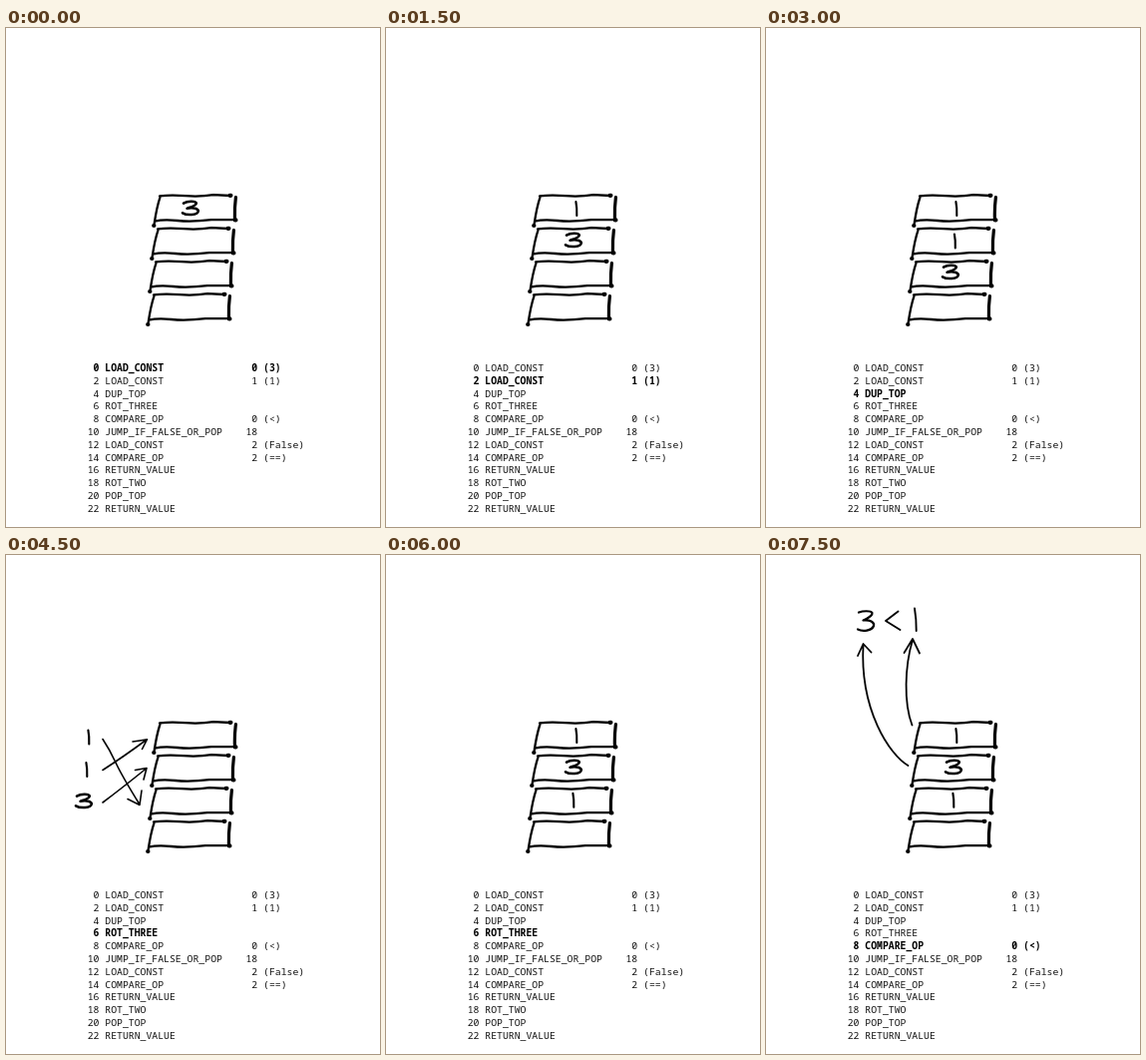
An HTML page for the animation above (8 s loop, 375 by 500 pixels).

```html
<!DOCTYPE html>
<html lang="en">
<head>
<meta charset="utf-8">
<title>Bytecode stack</title>
<style>
  html, body { margin: 0; width: 100%; height: 100%; overflow: hidden; background: #fff; }
  svg { display: block; width: 100%; height: 100%; }
  text { font: 9.8px "Noto Sans Mono", monospace; white-space: pre; fill: #111; }
  text.on { font-weight: 700; fill: #000; }
  path { fill: none; stroke: #000; stroke-linecap: round; stroke-linejoin: round; }
</style>
</head>
<body>
<svg id="stage" viewBox="0 0 375 500">
  <g id="boxes"></g>
  <g id="drawing"></g>
  <g id="code"></g>
</svg>
<script>
const STEP = 1500, LOOP = 8000;
const $ = id => document.getElementById(id);

const CODE = [
  ['LOAD_CONST', 0, '(3)'],
  ['LOAD_CONST', 1, '(1)'],
  ['DUP_TOP'],
  ['ROT_THREE'],
  ['COMPARE_OP', 0, '(<)'],
  ['JUMP_IF_FALSE_OR_POP', 18],
  ['LOAD_CONST', 2, '(False)'],
  ['COMPARE_OP', 2, '(==)'],
  ['RETURN_VALUE'],
  ['ROT_TWO'],
  ['POP_TOP'],
  ['RETURN_VALUE']
];

const stroke = (d, width, x = 0, y = 0) =>
  `<path d="${d}" stroke-width="${width}" transform="translate(${x} ${y})"/>`;

// One hand-drawn slot; its line ends are thickened with dots.
const slot = (x, y) =>
  stroke('M154 168.3Q166 167 180 168.2T208 167.2L225 168M154.5 169.5Q151 180 148.7 196' +
         'M149 193.6Q158 191.5 172 193T206 192.2L230 192.2', 2.3, x, y) +
  stroke('M230.4 169.5Q229 180 229.4 192', 3.2, x, y) +
  stroke('M224.6 167.8h.8M148.2 198h.2M229.8 192.4h.6', 4.2, x, y);

const GLYPHS = {
  1: 'M-.6 -7Q.6 -1 .3 7',
  3: 'M-7 -4.8C-3 -7.2 5 -7.4 5.8 -5C6.2 -2.4 0 -1 -3.4 .2C3 -1.2 8 .6 7.8 3C7.4 7.2 -4 7.4 -8 4.8'
};
const digit = (n, x, y) => stroke(GLYPHS[n], n === 1 ? 2.1 : 2.6, x, y);

// Centres of the digits in the top three slots.
const PLACES = {
  1: [[191, 181], [189.5, 213.5], [188, 245.8]],
  3: [[185, 180.5], [188, 212.5], [185, 244.5]]
};
const stack = (...values) => values.map((n, i) => digit(n, ...PLACES[n][i])).join('');

const rotation = () =>
  digit(1, 83, 182.5) + digit(1, 81, 215) + digit(3, 78, 246.5) +
  stroke('M97 215.5Q118 202 141 185M127 187Q134 186 141.5 184.7L136.5 194.5' +
         'M97 248Q117 233 140.5 214M129.5 215.5L141 213.5L138 225' +
         'M97 184.5Q104 195 110 208T134 250M122 244.5L134 250.5L136 236', 1.6);

const comparison = () =>
  stroke('M93 57.5C97 56 105 55.5 106.5 58C107 60.5 101 64 97.5 65.5' +
         'C104 64.5 109 67.5 108 71C106 76 97 77 92 74.5', 2.2) +
  stroke('M132.5 56.5L120 66L134.5 75M149 53.5Q150.8 64 150.7 76', 1.9) +
  stroke('M142.5 211C124 200 94 156 97.5 90M92 101L97.5 89L105.5 97.5' +
         'M146.5 170.5C138 148 139 112 147 85M138.5 98L147 84L154 98.5', 1.8);

const SCENES = [
  { line: 0, draw: () => stack(3) },
  { line: 1, draw: () => stack(1, 3) },
  { line: 2, draw: () => stack(1, 1, 3) },
  { line: 3, draw: rotation },
  { line: 3, draw: () => stack(1, 3, 1) },
  { line: 4, draw: () => stack(1, 3, 1) + comparison() }
];

$('boxes').innerHTML = [0, 1, 2, 3].map(i => slot(-2 * i, 33 * i)).join('');

const lines = CODE.map(([op, arg = '', note = ''], i) => {
  const el = document.createElementNS('http://www.w3.org/2000/svg', 'text');
  el.setAttribute('x', 81.7);
  el.setAttribute('y', 343.9 + 12.82 * i);
  el.textContent = String(2 * i).padStart(2) + ' ' + op.padEnd(23) +
    String(arg).padEnd(String(arg).length).padStart(arg === 18 ? 3 : 3) + ' ' + note;
  return $('code').appendChild(el);
});

let shown = -1;
function render(ms) {
  const index = Math.floor((ms % LOOP) / STEP);
  if (index === shown) return;
  shown = index;
  const { line, draw } = SCENES[index];
  $('drawing').innerHTML = draw();
  lines.forEach((el, i) => el.classList.toggle('on', i === line));
}

const start = performance.now();
function tick() {
  render(performance.now() - start);
  requestAnimationFrame(tick);
}
tick();
</script>
</body>
</html>
```
